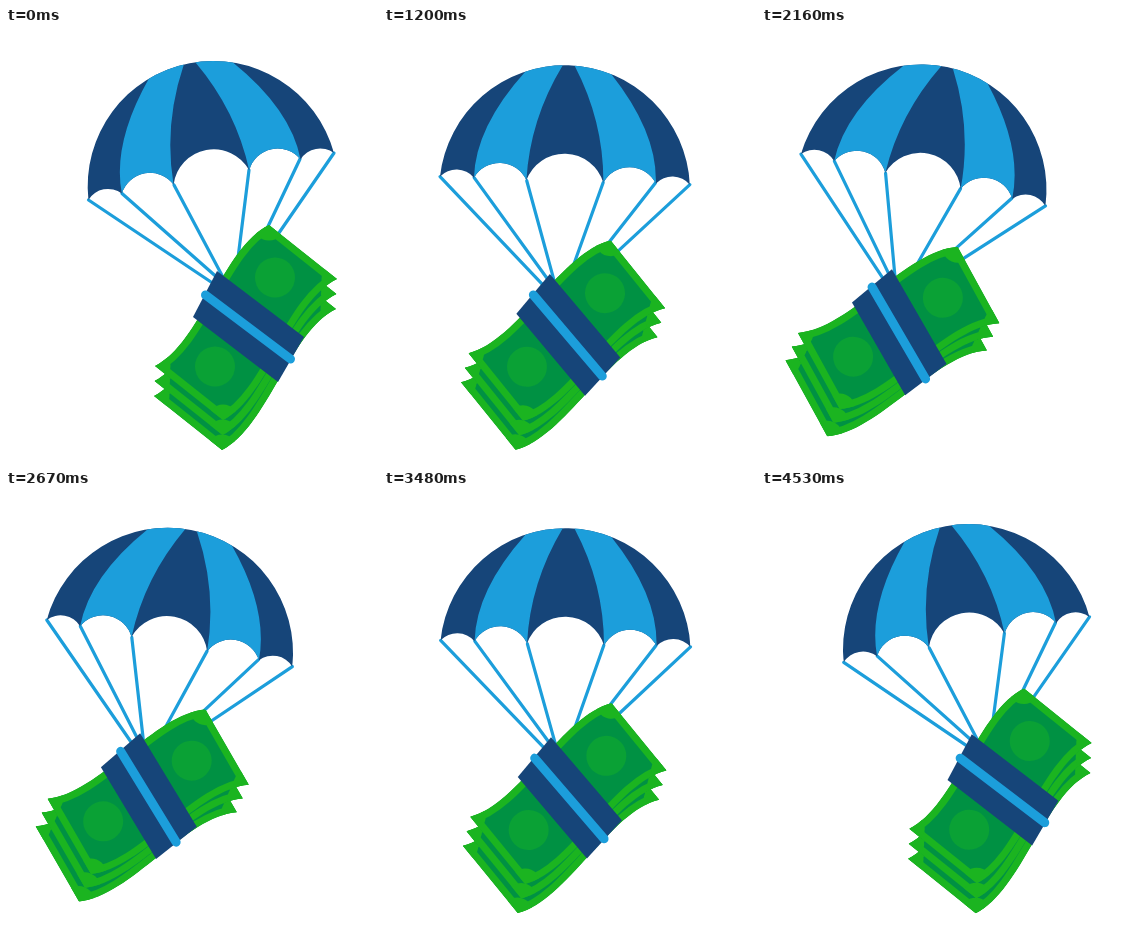
Animation of 372x435 px, one loop 4560 ms. Source, as an HTML page:

```html
<!DOCTYPE html>
<html lang="en">
<head>
<meta charset="utf-8">
<title>Cash parachute</title>
<style>
  html, body { margin: 0; width: 100%; height: 100%; overflow: hidden; background: #fff; }
  svg { display: block; width: 100vw; height: 100vh; }
</style>
</head>
<body>
<svg viewBox="0 0 372 435">
  <defs>
    <path id="note" d="M263 197 L331 251 C285 273 263 369 217 392 L149 338 C195 315 217 219 263 197 Z"/>
    <clipPath id="noteClip"><use href="#note"/></clipPath>
    <g id="bill" clip-path="url(#noteClip)">
      <use href="#note" fill="#009143" stroke="#1bb420" stroke-width="14"/>
      <g fill="#1bb420">
        <circle cx="263" cy="197" r="15.5"/>
        <circle cx="331" cy="251" r="15.5"/>
        <circle cx="217" cy="392" r="15.5"/>
        <circle cx="149" cy="338" r="15.5"/>
      </g>
      <g fill="#0aa135">
        <circle cx="269" cy="249.5" r="20"/>
        <circle cx="209" cy="338.5" r="20"/>
      </g>
    </g>
    <clipPath id="dome">
      <path d="M-125 0 A125.4 125.4 0 0 1 125 0 A23 23 0 0 0 91 0 A29.5 29.5 0 0 0 38.5 1
               A40.5 40.5 0 0 0 -38.5 1 A29.5 29.5 0 0 0 -91 0 A23 23 0 0 0 -125 0 Z"/>
    </clipPath>
  </defs>
  <g id="rig">
    <path id="cords" fill="none" stroke="#1c9edb" stroke-width="3.2" stroke-linecap="round"/>
    <g transform="translate(205.2 148.5) rotate(-10.8)">
      <g clip-path="url(#dome)">
        <rect x="-130" y="-120" width="260" height="130" fill="#164579"/>
        <g id="gores" fill="#1c9edb"></g>
      </g>
    </g>
    <use href="#bill" x="-1" y="30"/>
    <use href="#bill" x="-0.5" y="15"/>
    <use href="#bill"/>
    <path d="M211 243 L298 309 L272 354 L187 289 Z" fill="#164579"/>
    <path d="M199.5 267 L284.5 331" stroke="#1c9edb" stroke-width="9" stroke-linecap="round"/>
  </g>
</svg>
<script>
  const LOOP = 4560, TURN = 2370, STEP = 30, SWING = 25;
  const PIVOT = "174.5 41";
  const rig = document.getElementById("rig");

  // Each cord runs from a canopy tip to a point hidden behind the cash.
  const cords = [
    [82.5, 172, 208, 256], [116, 165.5, 214, 252], [168, 157, 219, 253],
    [243, 142, 232, 230], [294, 131, 257, 209], [328, 125, 266, 215]
  ];
  document.getElementById("cords").setAttribute("d",
    cords.map(([x, y, u, v]) => `M${x} ${y} L${u} ${v}`).join(" "));

  // The two light panels mirror each other.
  const gore = s => `<path d="M${-91 * s} 4 L${-91 * s} 0 Q${-91 * s} -51 ${-43 * s} -107.7
    L${-40 * s} -122 L${-6 * s} -122 L${-6 * s} -115
    Q${-37 * s} -60 ${-38.5 * s} 1 L${-38.5 * s} 4 Z"/>`;
  document.getElementById("gores").innerHTML = gore(1) + gore(-1);

  function draw(ms) {
    const t = Math.floor(ms % LOOP / STEP) * STEP;
    const k = t < TURN ? t / TURN : (LOOP - t) / (LOOP - TURN);
    rig.setAttribute("transform", `rotate(${SWING * k} ${PIVOT})`);
  }

  let start;
  function tick(now) {
    start ??= now;
    draw(now - start);
    requestAnimationFrame(tick);
  }
  draw(0);
  requestAnimationFrame(tick);
</script>
</body>
</html>
```
